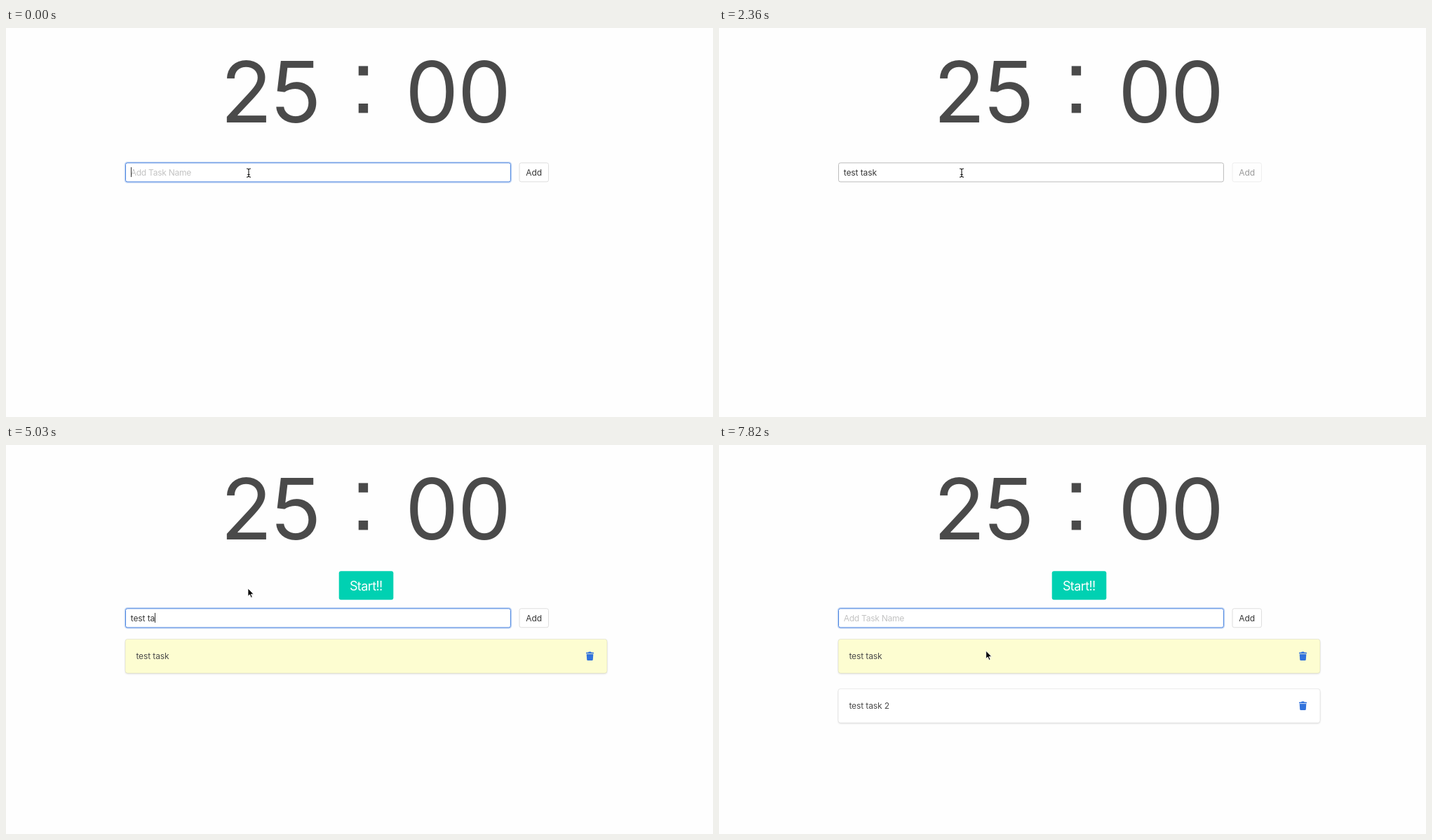
An HTML page that plays this animation: 1008 by 556 pixels, repeating every 8000 ms.

```html
<!DOCTYPE html>
<html lang="en">
<head>
<meta charset="utf-8">
<title>Task timer</title>
<style>
  html, body { margin: 0; width: 100%; height: 100%; overflow: hidden; background: #fefefe; }
  svg { display: block; width: 1008px; height: 556px; }
  text { font: 12px Inter, "Open Sans", sans-serif; letter-spacing: -.1px; fill: #363636; }
  .hint { letter-spacing: -.25px; fill: #c3c3c3; }
  .mid { text-anchor: middle; }
  .clock text { font-size: 121px; font-optical-sizing: none; letter-spacing: 0; text-anchor: middle; }
  .clock * { fill: #4a4a4a; }
  .card rect { filter: drop-shadow(0 1.2px 1.2px rgba(10, 10, 10, .12)); stroke: rgba(10, 10, 10, .1); stroke-width: .8; }
  .card text { fill: #4a4a4a; }
</style>
</head>
<body>
<svg viewBox="0 0 1008 556">
  <defs>
    <path id="trash" fill="#3273dc" d="M827 297.2q0-.7.7-.7h2.4l.7-1h3.2l.7 1h2.6q.7 0 .7.7v1h-11zM827.7 299h9.6l-.5 7.7q-.1 1.3-1.4 1.3h-5.8q-1.3 0-1.4-1.3z"/>
  </defs>

  <g class="clock">
    <text x="342.6" y="134.7">2</text>
    <text x="413.6" y="134.7">5</text>
    <rect x="502.7" y="54.4" width="13.4" height="13.4"/>
    <rect x="502.7" y="108" width="13.4" height="13.4"/>
    <text x="607.2" y="134.7">0</text>
    <text x="682" y="134.7">0</text>
  </g>

  <g id="start">
    <rect x="474.7" y="180.3" width="77.6" height="41" rx="3" fill="#00d1b2"/>
    <text class="mid" x="513.3" y="208" style="font-size:18px;letter-spacing:-.6px;fill:#fff">Start!!</text>
  </g>

  <g id="form">
    <rect id="halo" x="169.4" y="191.7" width="551.1" height="29.4" rx="3.8" fill="none" stroke="#3273dc" stroke-opacity=".25" stroke-width="1.5"/>
    <rect id="field" x="170.5" y="192.8" width="548.9" height="27.1" rx="2.6" fill="#fff" stroke-width=".9"/>
    <text id="entry" x="177.7" y="211" xml:space="preserve"></text>
    <rect id="caret" y="199" width="1" height="14" fill="#363636"/>
    <rect id="button" x="732" y="192.8" width="41.5" height="27" rx="2.6" fill="#fff" stroke="#dbdbdb" stroke-width=".9"/>
    <text id="add" class="mid" x="752.7" y="211">Add</text>
  </g>

  <g class="card" id="first">
    <rect x="170" y="277.4" width="687" height="48.8" rx="3.5" fill="#fdfdd1"/>
    <text x="185.4" y="306.3">test task</text>
    <use href="#trash"/>
  </g>
  <g class="card" id="second" transform="translate(0 71)">
    <rect x="170" y="277.4" width="687" height="48.8" rx="3.5" fill="#fff"/>
    <text x="185.4" y="306.3">test task 2</text>
    <use href="#trash"/>
  </g>

  <path id="beam" fill="none" stroke="#111" stroke-width="1.1" d="M343 201q3 0 3 1.6v9q0 1.6-3 1.6M349 201q-3 0-3 1.6M346 211.6q0 1.6 3 1.6M344.3 209.5h3.4"/>
  <path id="arrow" fill="#000" stroke="#fff" stroke-width=".8" d="M0 0v11.2l2.5-2.4 1.9 4.4 1.9-.8-1.9-4.2h3.6z"/>
</svg>
<script>
const LOOP = 8000;
const FIRST = { submit: 2270, done: 2540 };
const SECOND = { submit: 6820, done: 7030 };
const BLINK = { on: 540, period: 990 };

// Bursts of steady typing: first key, time per key, text
const BURSTS = [
  { start: 300, pace: 90, text: 'test' },
  { start: 920, pace: 202, text: ' task' },
  { start: 3890, pace: 85, text: 'test' },
  { start: 4410, pace: 236, text: ' task 2' },
];

const $ = id => document.getElementById(id);
const set = (id, name, value) => $(id).setAttribute(name, value);
const show = (id, on) => set(id, 'visibility', on ? 'visible' : 'hidden');
const within = (t, a, b) => t >= a && t < b;
const clamp = (v, lo, hi) => Math.min(hi, Math.max(lo, v));

// Text in the field, and the time the caret last restarted its blink
function typing(t) {
  const cleared = [SECOND.done, FIRST.done, -450].find(c => c <= t);
  let text = '', last = cleared;
  for (const b of BURSTS) {
    if (!within(b.start, cleared, t + 1)) continue;
    const keys = Math.min(b.text.length, Math.floor((t - b.start) / b.pace) + 1);
    text += b.text.slice(0, keys);
    last = b.start + (keys - 1) * b.pace;
  }
  return { text, last };
}

// The arrow follows a quadratic curve in five jumps
function pointer(t) {
  const p = clamp(Math.floor((t - 7395) / 85), 0, 5) / 5, q = 1 - p;
  const curve = (a, b, c) => q * q * a + 2 * p * q * b + p * p * c;
  return [curve(345, 404, 380.7), curve(205, 252, 294.2)];
}

function draw(now) {
  const t = now % LOOP;
  const added = t >= FIRST.done;
  const busy = [FIRST, SECOND].some(s => within(t, s.submit, s.done));
  const { text, last } = typing(t);
  const entry = $('entry');

  show('start', added);
  show('first', added);
  show('second', t >= SECOND.done);
  set('form', 'transform', `translate(0 ${added ? 41 : 0})`);

  entry.textContent = text || 'Add Task Name';
  set('entry', 'class', text ? '' : 'hint');
  show('caret', !busy && (t - last) % BLINK.period < BLINK.on);
  set('caret', 'x', text ? Math.round(177.6 + entry.getComputedTextLength()) : 178);

  show('halo', !busy);
  set('field', 'stroke', !busy ? '#3273dc' : added ? '#dbdbdb' : '#b5b5b5');
  set('add', 'opacity', busy ? .5 : 1);
  set('button', 'opacity', busy && !added ? .5 : 1);

  show('beam', t < 2630);
  show('arrow', t >= 2630);
  set('arrow', 'transform', `translate(${pointer(t)})`);
  requestAnimationFrame(draw);
}
requestAnimationFrame(draw);
</script>
</body>
</html>
```
